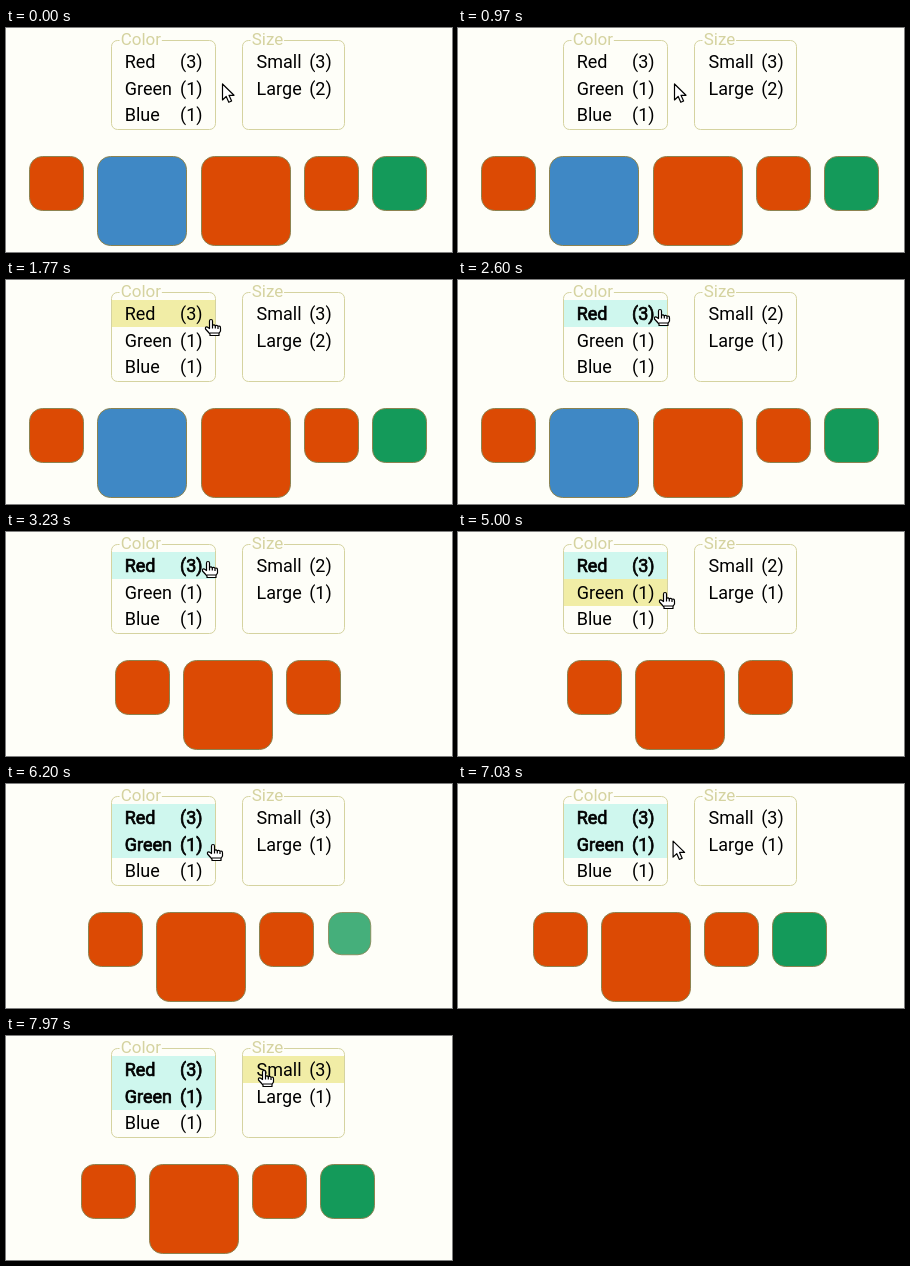
An HTML page with a canvas that plays this animation: 446x224 px, repeating every 8 s.

```html
<!DOCTYPE html>
<html lang="en">
<head>
<meta charset="utf-8">
<title>Facet filter</title>
<style>
  html, body { margin: 0; height: 100%; overflow: hidden; background: #fefef8; }
  canvas { display: block; width: 446px; height: 224px; }
</style>
</head>
<body>
<canvas id="stage"></canvas>
<script>
const LOOP = 8000, WIDTH = 446, HEIGHT = 224;
const PAPER = '#fefef8', LINE = '#d5d3a0', HOVER = '#f1eda6', SELECTED = '#cff7ee';
const FILLS = { Red: '#dc4a04', Green: '#149a5a', Blue: '#3f88c5' };
const SIZES = { Small: 55, Large: 90 };
const GAP = 13.3, CENTER = 222.03, RESIZE_TIME = 500;

const items = [
  ['Red', 'Small'], ['Blue', 'Large'], ['Red', 'Large'], ['Red', 'Small'], ['Green', 'Small']
].map(([color, size]) => ({ color, size }));

const facets = [
  { key: 'color', title: 'Color', x: 105.5, width: 104, labelX: 118.7, countX: 174, values: ['Red', 'Green', 'Blue'] },
  { key: 'size', title: 'Size', x: 236.5, width: 102, labelX: 250.6, countX: 303.2, values: ['Small', 'Large'] }
];
const rows = [{ top: 20, baseline: 40 }, { top: 47, baseline: 67 }, { top: 74, baseline: 93 }];

const clicks = [{ at: 2600, color: 'Red' }, { at: 5850, color: 'Green' }];

// Pointer hotspot at rest, with the time span of the move that leads there.
const moves = [
  { start: 0, end: 0, x: 216, y: 55.5 },
  { start: 1350, end: 1770, x: 205, y: 39.5 },
  { start: 1770, end: 2150, x: 202, y: 29.5 },
  { start: 4200, end: 4650, x: 207, y: 60.5 },
  { start: 6800, end: 7750, x: 258, y: 34.5 }
];

const arrow = new Path2D('M.5 .5V16.5L4.2 13L6.8 18.8L9.6 17.5L7 11.8H12Z');
const hand = new Path2D(
  'M-1.5 9V1.5Q-1.5 0 0 0T1.5 1.5V6Q3 4.7 4.3 6.3Q6 5.2 7 6.8Q9.5 6 9.5 8.5V11.5L8 14V16H-1V14.5L-5.5 9.5Q-6 7 -3.7 7.5Z');
const knuckles = new Path2D('M1.5 6V9M4.3 6.5V9M7 7V9.5M-1 13.5H8');

const canvas = document.getElementById('stage');
const ctx = canvas.getContext('2d');
const scale = window.devicePixelRatio || 1;
canvas.width = WIDTH * scale;
canvas.height = HEIGHT * scale;
ctx.scale(scale, scale);

function progress(time, start, end) {
  const p = Math.min(1, Math.max(0, (time - start) / (end - start)));
  return p * p * (3 - 2 * p);
}

function pointerAt(time) {
  let { x, y } = moves[0];
  for (const move of moves.slice(1)) {
    const p = progress(time, move.start, move.end);
    x += (move.x - x) * p;
    y += (move.y - y) * p;
  }
  return { x, y };
}

// 1 for an item at full size, 0 for one that is filtered out.
function presenceAt(item, time) {
  let presence = 1;
  clicks.forEach(({ at }, i) => {
    const goal = clicks.slice(0, i + 1).some(click => click.color === item.color) ? 1 : 0;
    presence += (goal - presence) * progress(time, at, at + RESIZE_TIME);
  });
  return presence;
}

function roundBox(x, y, width, height, radius, stroke, fill) {
  ctx.beginPath();
  ctx.roundRect(x, y, width, height, radius);
  if (fill) {
    ctx.fillStyle = fill;
    ctx.fill();
  }
  ctx.strokeStyle = stroke;
  ctx.lineWidth = 1;
  ctx.stroke();
}

function text(string, x, y, bold) {
  ctx.fillText(string, x, y);
  if (bold) ctx.strokeText(string, x, y);
}

function drawFacet(facet, pool, selected, pointer) {
  let hovering = false;
  facet.values.forEach((value, i) => {
    const { top, baseline } = rows[i];
    const hovered = pointer.x > facet.x && pointer.x < facet.x + facet.width &&
      pointer.y >= top && pointer.y < top + 27;
    const active = selected.includes(value);
    hovering ||= hovered;
    if (active || hovered) {
      ctx.fillStyle = active ? SELECTED : HOVER;
      ctx.fillRect(facet.x + .5, top, facet.width - 1, 27);
    }
    const count = pool.filter(item => item[facet.key] === value).length;
    ctx.font = '18px Roboto, sans-serif';
    ctx.fillStyle = ctx.strokeStyle = '#000';
    ctx.lineWidth = .7;
    text(value, facet.labelX, baseline, active);
    text(`(${count})`, facet.countX, baseline, active);
  });

  roundBox(facet.x, 12.5, facet.width, 89, 6, LINE);
  ctx.font = '17px Roboto, sans-serif';
  ctx.fillStyle = PAPER;
  ctx.fillRect(facet.x + 8, 10, ctx.measureText(facet.title).width + 2, 5);
  ctx.fillStyle = LINE;
  text(facet.title, facet.x + 9.2, 17);
  return hovering;
}

function drawItems(time) {
  const boxes = items.map(item => ({ ...item, presence: presenceAt(item, time) }));
  const slot = box => (SIZES[box.size] + GAP) * box.presence;
  let x = CENTER + GAP / 2 - boxes.reduce((sum, box) => sum + slot(box), 0) / 2;
  for (const box of boxes) {
    const side = SIZES[box.size] * box.presence;
    if (side > 1) {
      ctx.globalAlpha = box.presence;
      roundBox(Math.round(x) + .5, 128.5, side - 1, side - 1, 13, '#8c8350', FILLS[box.color]);
    }
    x += slot(box);
  }
  ctx.globalAlpha = 1;
}

function drawPointer({ x, y }, hovering) {
  ctx.save();
  ctx.translate(x, y);
  ctx.fillStyle = '#fff';
  ctx.strokeStyle = '#000';
  ctx.lineWidth = 1.2;
  ctx.lineJoin = 'round';
  const shape = hovering ? hand : arrow;
  ctx.fill(shape);
  ctx.stroke(shape);
  if (hovering) ctx.stroke(knuckles);
  ctx.restore();
}

function draw(time) {
  const pointer = pointerAt(time);
  const selected = clicks.filter(click => time >= click.at).map(click => click.color);
  const matching = items.filter(item => !selected.length || selected.includes(item.color));

  ctx.fillStyle = PAPER;
  ctx.fillRect(0, 0, WIDTH, HEIGHT);
  const overColor = drawFacet(facets[0], items, selected, pointer);
  const overSize = drawFacet(facets[1], matching, selected, pointer);
  drawItems(time);
  drawPointer(pointer, overColor || overSize);
}

const begin = performance.now();
function frame() {
  draw((performance.now() - begin) % LOOP);
  requestAnimationFrame(frame);
}
frame();
</script>
</body>
</html>
```
